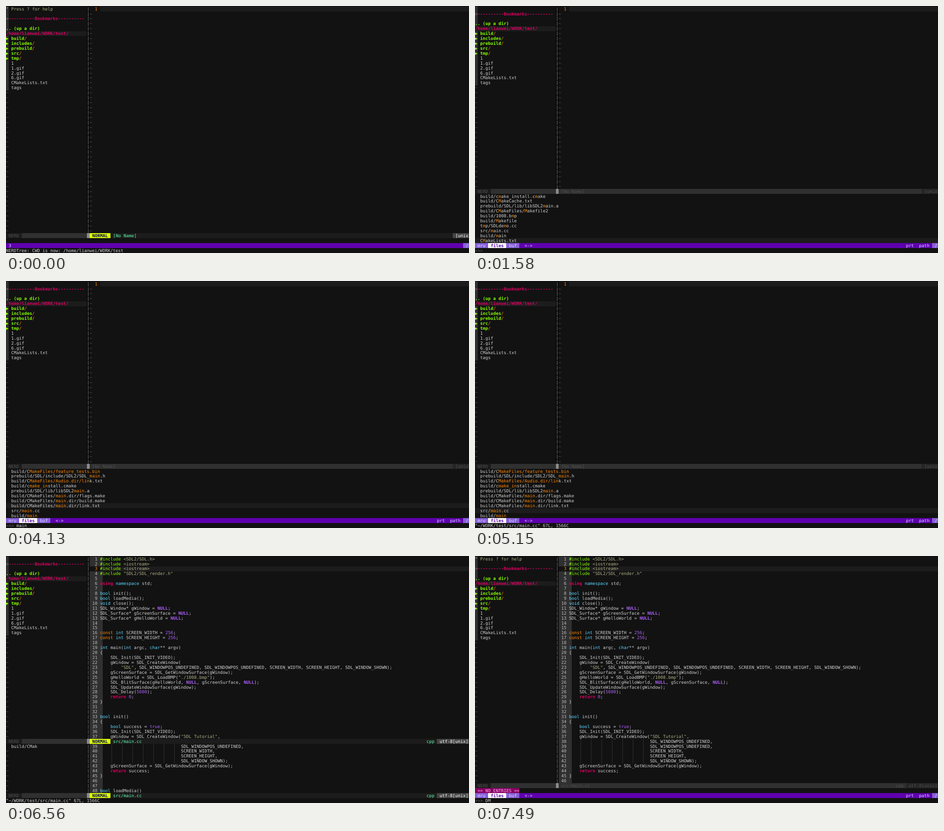
Animation of 1024 by 547 pixels, one loop 8 s. Source, as an HTML page:

```html
<!DOCTYPE html>
<html lang="en">
<head>
<meta charset="utf-8">
<title>Fuzzy file finder</title>
<style>
html, body { margin: 0; width: 100%; height: 100%; overflow: hidden; background: #121212; }
svg { display: block; width: 100vw; height: 100vh; }
text { font: 9.596px "DejaVu Sans Mono", monospace; white-space: pre; text-rendering: geometricPrecision; }
rect { shape-rendering: crispEdges; }
.b { font-weight: bold; }
</style>
</head>
<body>
<svg id="screen" viewBox="0 0 1024 547" preserveAspectRatio="none"></svg>
<script>
const CW = 5.777, RH = 10.92, TOP = 0.9, EDGE = 178, SPLIT = 31, ED = 32, CODE = 36, LOOP = 8000;
const C = {
  bg: '#121212', line: '#1c1c1c', strip: '#303030', sep: '#808080', text: '#d0d0d0', num: '#bcbcbc',
  dim: '#5f5f5f', off: '#4e4e4e', offB: '#262626', green: '#87ff00', orange: '#ff8700', pink: '#d7005f',
  khaki: '#afaf87', cyan: '#5fd7ff', violet: '#af5fff', mint: '#5fffaf', purple: '#5f00af', lilac: '#875fd7',
  pale: '#d7d7ff'
};
const USER = 'lianwei';

const tree = [
  '" Press ? for help', '', '>----------Bookmarks----------', '', '.. (up a dir)', `/home/${USER}/WORK/test/`,
  ...['build', 'includes', 'prebuild', 'src', 'tmp'].map(d => `▶ ${d}/`),
  ...['1', '1.gif', '2.gif', '6.gif', 'CMakeLists.txt', 'tags'].map(f => '  ' + f)
];

const pad = ' '.repeat(31);
const code = `#include <SDL2/SDL.h>
#include <iostream>
#include <iostream>
#include "SDL2/SDL_render.h"

using namespace std;

bool init();
bool loadMedia();
void close();
SDL_Window* gWindow = NULL;
SDL_Surface* gScreenSurface = NULL;
SDL_Surface* gHelloWorld = NULL;


const int SCREEN_WIDTH = 256;
const int SCREEN_HEIGHT = 256;

int main(int argc, char** argv)
{
    SDL_Init(SDL_INIT_VIDEO);
    gWindow = SDL_CreateWindow(
        "SDL", SDL_WINDOWPOS_UNDEFINED, SDL_WINDOWPOS_UNDEFINED, SCREEN_WIDTH, SCREEN_HEIGHT, SDL_WINDOW_SHOWN);
    gScreenSurface = SDL_GetWindowSurface(gWindow);
    gHelloWorld = SDL_LoadBMP("./1008.bmp");
    SDL_BlitSurface(gHelloWorld, NULL, gScreenSurface, NULL);
    SDL_UpdateWindowSurface(gWindow);
    SDL_Delay(5000);
    return 0;
}


bool init()
{
    bool success = true;
    SDL_Init(SDL_INIT_VIDEO);
    gWindow = SDL_CreateWindow("SDL Tutorial",
${pad}SDL_WINDOWPOS_UNDEFINED,
${pad}SDL_WINDOWPOS_UNDEFINED,
${pad}SCREEN_WIDTH,
${pad}SCREEN_HEIGHT,
${pad}SDL_WINDOW_SHOWN);
    gScreenSurface = SDL_GetWindowSurface(gWindow);
    return success;
}


bool loadMedia()`.split('\n');

const words = s => s.trim().split(/\s+/);
const lists = {
  all: words(`build/CMakeCache.txt build/cmake_install.cmake build/Makefile build/main CMakeLists.txt
    tags 6.gif 2.gif 1.gif 1`),
  m: words(`build/cmake_install.cmake build/CMakeCache.txt prebuild/SDL/lib/libSDL2main.a
    build/CMakeFiles/Makefile2 build/1008.bmp build/Makefile tmp/SDLdemo.cc src/main.cc build/main CMakeLists.txt`),
  ma: words(`build/CMakeFiles/main.dir/link.txt build/CMakeFiles/progress.marks build/cmake_install.cmake
    build/CMakeCache.txt prebuild/SDL/lib/libSDL2main.a build/CMakeFiles/Makefile2 build/Makefile
    src/main.cc build/main CMakeLists.txt`),
  main: words(`build/CMakeFiles/feature_tests.bin prebuild/SDL/include/SDL2/SDL_main.h
    build/CMakeFiles/Audio.dir/link.txt build/cmake_install.cmake prebuild/SDL/lib/libSDL2main.a
    build/CMakeFiles/main.dir/flags.make build/CMakeFiles/main.dir/build.make
    build/CMakeFiles/main.dir/link.txt src/main.cc build/main`),
  D: words(`prebuild/SDL/lib/libSDL2_test.a prebuild/SDL/lib/libSDL2main.a prebuild/SDL/bin/sdl2-config
    prebuild/SDL/lib/libSDL2.la prebuild/SDL/include/SDL2/SDL_egl.h prebuild/SDL/lib/libSDL2.a
    prebuild/SDL/share/aclocal/sdl2.m4 prebuild/SDL/lib/pkgconfig/sdl2.pc
    prebuild/SDL/include/SDL2/SDL.h tmp/SDLdemo.cc`)
};

// Each step changes part of the state; rows is the height of the finder window.
const opened = '"~/WORK/test/src/main.cc"';
const steps = [
  [0, { rows: 1, scan: 3, active: true, list: null, query: '', sel: 9, prompt: null,
    msg: `NERDTree: CWD is now: /home/${USER}/WORK/test`, file: false, cur: 0, partial: false }],
  [100, { scan: 14 }],
  [174, { scan: 30 }],
  [248, { scan: 0, active: false }],
  [322, { rows: 10 }],
  [396, { list: 'all', msg: '' }],
  [470, { prompt: '' }],
  [1580, { list: 'm', query: 'm' }],
  [1680, { list: 'ma', query: 'ma', prompt: 'm' }],
  [1765, { list: 'main', query: 'mai', prompt: 'mai' }],
  [1850, { query: 'main', prompt: 'main' }],
  [3140, { sel: 8 }],
  [3780, { sel: 7 }],
  [3930, { sel: 6 }],
  [4130, { sel: 7 }],
  [4300, { sel: 8 }],
  [4730, { prompt: null }],
  [4830, { msg: opened }],
  [5150, { msg: opened + ' 67L, 1566C' }],
  [5290, { rows: 0, active: true, file: true, list: null, query: '' }],
  [5850, { cur: 1 }],
  [6060, { cur: 2 }],
  [6560, { rows: 10, partial: true }],
  [6660, { partial: false, active: false, list: 'all', sel: 9, msg: '' }],
  [6720, { prompt: '' }],
  [7300, { list: 'D', query: 'D' }],
  [7360, { prompt: 'D' }],
  [7490, { rows: 1, list: null, prompt: 'DM' }]
];

let out = '';
const esc = s => s.replace(/&/g, '&amp;').replace(/</g, '&lt;');

function fill(row, from, to, color) {
  const y = Math.round(TOP + row * RH), end = Math.round(TOP + (row + 1) * RH);
  const x = Math.round(from * CW);
  out += `<rect x="${x}" y="${y}" width="${Math.round(to * CW) - x}" height="${end - y}" fill="${color}"/>`;
}

function put(row, col, s, color = C.text, bold = false) {
  if (!s.trim()) return;
  const lead = s.length - s.trimStart().length;
  out += `<text x="${((col + lead) * CW).toFixed(2)}" y="${(TOP + row * RH + 8.7).toFixed(2)}" fill="${color}"` +
    `${bold ? ' class="b"' : ''}>${esc(s.trim())}</text>`;
}

// Draws a line in pieces; style(match) returns [color, bold] for matched parts.
function putParts(row, col, s, regex, style) {
  let at = 0;
  for (const m of s.matchAll(regex)) {
    put(row, col + at, s.slice(at, m.index));
    put(row, col + m.index, m[0], ...style(m));
    at = m.index + m[0].length;
  }
  put(row, col + at, s.slice(at));
}

const syntax = /("[^"]*"|<[\w\/.]+>)|(#include)|\b(using|return)\b|\b(bool|void|int|char|namespace)\b|\b(const)\b|\b(NULL)\b|\b(true|\d+)\b/g;
const styles = [[C.khaki], [C.green], [C.pink, true], [C.cyan], [C.orange], [C.violet, true], [C.violet]];
const codeStyle = m => styles[m.slice(1).findIndex(Boolean)];

function drawTreeLine(row, s) {
  const here = s[0] === '/';
  if (here) fill(row, 0, SPLIT, C.line);
  else fill(row, 0, 1, C.strip);
  if (s[0] === '"') put(row, 0, s, C.khaki);
  else if (s[0] === '>') {
    put(row, 0, '>', C.sep);
    put(row, 1, s.slice(1), C.pink, true);
  } else if (here) put(row, 0, s, C.pink, true);
  else if (s[0] === '.') put(row, 0, s, C.green, true);
  else if (s[0] === '▶') {
    put(row, 0, '▶', C.green);
    put(row, 2, s.slice(2, -1), C.green, true);
    put(row, s.length - 1, '/', C.orange);
  } else put(row, 0, s);
}

function drawCodeLine(row, s, cur) {
  if (row === cur) fill(row, CODE, EDGE, C.line);
  else fill(row, ED, CODE + 1, C.strip);
  put(row, ED, String(row + 1).padStart(3), row === cur ? C.orange : C.num);
  const indent = s.search(/\S/);
  for (let i = 4; i < indent; i += 4) put(row, CODE + i, '┊', C.off);
  putParts(row, CODE, s, syntax, codeStyle);
}

function drawStatus(row, st) {
  const name = st.file ? 'src/main.cc' : '[No Name]';
  const enc = st.file ? 'utf-8[unix]' : '[unix';
  const encCol = 177 - enc.length;
  const on = st.active;
  fill(row, 0, 6, C.line);
  fill(row, 6, SPLIT, C.strip);
  fill(row, SPLIT, ED, '#8a8a8a');
  put(row, 1, 'NERD', C.off);
  fill(row, ED, EDGE, on ? C.line : C.strip);
  fill(row, encCol - 1, EDGE, on ? '#444444' : C.offB);
  if (on) {
    fill(row, ED, 40, '#dfff00');
    put(row, 33, 'NORMAL', '#00005f', true);
  }
  put(row, on ? 41 : 33, name, on ? C.mint : C.off);
  if (st.file) put(row, 161, 'cpp', on ? C.mint : C.off);
  put(row, encCol, enc, on ? '#ffffff' : C.off);
}

function drawFinderBar(scan) {
  const row = 48;
  fill(row, 0, EDGE, C.purple);
  fill(row, 175, EDGE, C.lilac);
  put(row, 176, '/', C.pale);
  if (scan) return put(row, 1, String(scan), C.pale);
  fill(row, 0, 17, C.lilac);
  fill(row, 5, 12, '#ffffff');
  put(row, 1, 'mru', C.pale);
  put(row, 6, 'files', C.purple, true);
  put(row, 13, 'buf', C.pale);
  put(row, 19, '<->', C.pale);
  put(row, 165, 'prt', C.pale);
  put(row, 170, 'path', C.pale);
}

// Exact hits first, otherwise the shortest span holding the letters in order.
function hits(s, query) {
  if (!query) return /$^/g;
  const flags = query === query.toLowerCase() ? 'gi' : 'g';
  if (s.includes(query) || query.length === 1) return new RegExp(query, flags);
  return new RegExp([...query].map((c, i) => i ? `[^${c}]*${c}` : c).join(''), 'i' + 'g');
}

function drawList(st, top) {
  lists[st.list].forEach((s, i) => {
    if (i === st.sel) fill(top + i, 0, EDGE, C.line);
    putParts(top + i, 2, s, hits(s, st.query), () => [C.orange]);
  });
}

function drawPanes(st, bar) {
  const rows = st.partial ? 48 : bar;
  const skip = st.rows === 10 ? 1 : 0;
  for (let r = 0; r < rows; r++) {
    if (st.partial && r === bar) continue;
    const t = tree[r + skip];
    if (st.partial && r === bar + 1) put(r, 2, 'build/CMak');
    else if (t !== undefined) drawTreeLine(r, t);
    else put(r, 0, '~', C.dim);
    fill(r, SPLIT, ED, '#080808');
    put(r, SPLIT, '|', C.sep, true);
    if (st.file) drawCodeLine(r, code[r], st.cur);
    else if (r === 0) {
      fill(0, CODE, EDGE, C.line);
      put(0, 34, '1', C.orange);
    } else put(r, ED, '~', C.dim);
  }
}

function draw(st) {
  const bar = st.rows ? 47 - st.rows : 48;
  out = `<rect width="1024" height="547" fill="${C.bg}"/>`;
  drawPanes(st, bar);
  drawStatus(bar, st);
  if (st.partial) drawStatus(48, st);
  else if (st.rows) {
    drawFinderBar(st.scan);
    if (st.list) drawList(st, bar + 1);
    else if (st.prompt) {
      fill(47, 0, 17, '#87005f');
      put(47, 1, '== NO ENTRIES ==', '#ffafff');
    }
  }
  if (st.prompt === null) put(49, 0, st.msg);
  else {
    put(49, 0, '>>>', C.dim);
    put(49, 4, st.prompt);
    put(49, 4 + st.prompt.length, '_', '#8a8a8a');
  }
  document.getElementById('screen').innerHTML = out;
}

let shown = -1;
function tick(now) {
  const t = now % LOOP;
  const n = steps.filter(s => s[0] <= t).length;
  if (n !== shown) {
    shown = n;
    draw(Object.assign({}, ...steps.slice(0, n).map(s => s[1])));
  }
  requestAnimationFrame(tick);
}
tick(performance.now());
</script>
</body>
</html>
```
